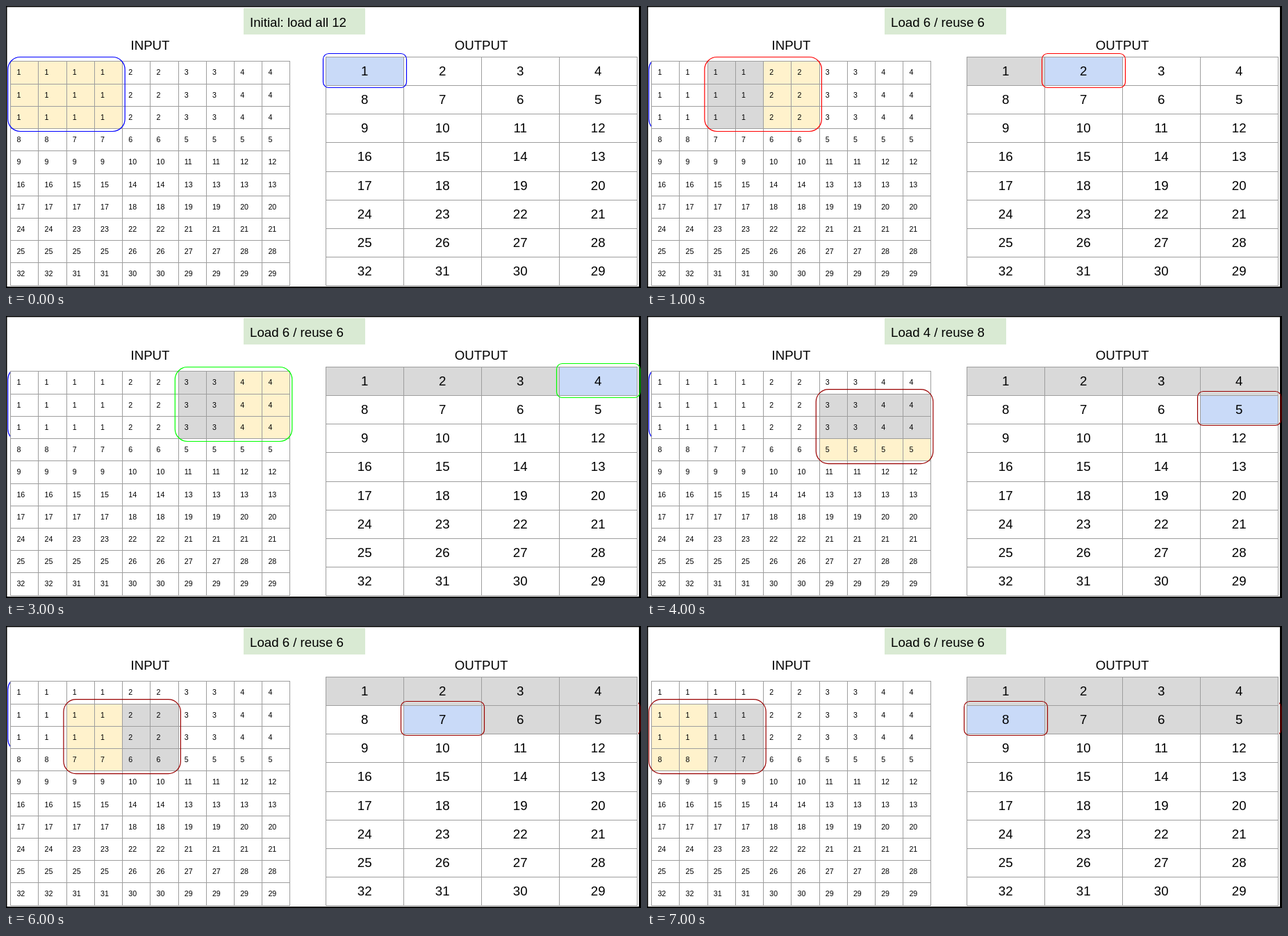
These frames come from a looping animation (914x406 px, 8000 ms). An HTML page:

```html
<!DOCTYPE html>
<html lang="en">
<head>
<meta charset="utf-8">
<title>Sliding window reuse</title>
<style>
  html, body { margin: 0; width: 100%; height: 100%; overflow: hidden; background: #fff; }
  svg { display: block; width: 914px; height: 406px; font-family: "Liberation Sans", Arial, sans-serif; }
  .fills, .lines { shape-rendering: crispEdges; }
  .lines { fill: #9e9e9e; }
  .big { font-size: 18.67px; }
  .small { font-size: 10.67px; }
  .mid { text-anchor: middle; }
  .outline { fill: none; stroke-width: 1.2; }
</style>
</head>
<body>
<svg viewBox="0 0 914 406">
  <defs>
    <clipPath id="leftEdge"><rect x="0" y="79" width="6" height="97"/></clipPath>
    <clipPath id="rightEdge"><rect x="910" y="100" width="4" height="65"/></clipPath>
  </defs>
  <path d="M0 0H914V406H0ZM1.5 1.5V404H911V1.5Z" fill-rule="evenodd"/>
  <rect x="342" y="3" width="175" height="38" fill="#d9ead3"/>
  <text id="title" class="big" x="351" y="29.5"></text>
  <text class="big mid" x="207.5" y="63">INPUT</text>
  <text class="big mid" x="684" y="63">OUTPUT</text>
  <g id="fills" class="fills"></g>
  <g id="lines" class="lines"></g>
  <g id="numbers"></g>
  <g id="outlines"></g>
</svg>
<script>
const STEP_MS = 1000, STEPS = 8;
const LOADED = '#fff2cc', REUSED = '#d9d9d9', CURRENT = '#c9daf8';
const STROKES = ['#0000ff', '#ff0000', '#9900ff', '#00ff00', '#990000'];
const input = { x: 6.2, y: 79.4, w: 40.22, h: 32.23, cols: 10, rows: 10 };
const output = { x: 460, y: 73, w: 112, h: 41.15, cols: 4, rows: 8 };
const byId = id => document.getElementById(id);

const rect = (x, y, w, h, attrs = '') =>
  `<rect x="${x}" y="${y}" width="${w}" height="${h}" ${attrs}/>`;
const colX = (grid, c) => Math.round(grid.x + c * grid.w);
const rowY = (grid, r) => Math.round(grid.y + r * grid.h);
const fillCell = (grid, c, r, color) => {
  const x = colX(grid, c), y = rowY(grid, r);
  return rect(x, y, colX(grid, c + 1) - x, rowY(grid, r + 1) - y, `fill="${color}"`);
};

// The output is visited in a snake: even rows left to right, odd rows back.
const outputValue = (c, r) => r * 4 + (r % 2 ? 4 - c : c + 1);
const inputValue = (c, r) => {
  const row = Math.max(0, r - 2), pair = Math.floor(c / 2);
  return outputValue(row % 2 ? Math.min(3, pair) : Math.max(0, pair - 1), row);
};
const position = step => {
  const row = Math.floor(step / 4);
  return { row, col: row % 2 ? 7 - step : step };
};
const inWindow = (step, c, r) => {
  if (step < 0) return false;
  const { col, row } = position(step);
  return c >= col * 2 && c < col * 2 + 4 && r >= row && r < row + 3;
};

function gridLines(grid) {
  const x = colX(grid, 0), y = rowY(grid, 0);
  const width = colX(grid, grid.cols) - x + 1, height = rowY(grid, grid.rows) - y + 1;
  let out = '';
  for (let c = 0; c <= grid.cols; c++) out += rect(colX(grid, c), y, 1, height);
  for (let r = 0; r <= grid.rows; r++) out += rect(x, rowY(grid, r), width, 1);
  return out;
}

function gridNumbers(grid, value, cls, dx, dy) {
  let out = '';
  for (let r = 0; r < grid.rows; r++)
    for (let c = 0; c < grid.cols; c++)
      out += `<text class="${cls}" x="${grid.x + c * grid.w + dx}" y="${grid.y + r * grid.h + dy}">${value(c, r)}</text>`;
  return out;
}

const outlineAttrs = (step, radius, clip) =>
  `class="outline" rx="${radius}" stroke="${STROKES[Math.min(step, 4)]}"` + (clip ? ` clip-path="url(#${clip})"` : '');

function inputOutline(step, clip) {
  const { col, row } = position(step);
  return rect(2.7 + col * 80.2, 73.5 + row * 32.1, 168.5, 107, outlineAttrs(step, 17.8, clip));
}

function outputOutline(step, clip) {
  const { col, row } = position(step);
  return rect(456.5 + col * 112, 68.5 + row * 40, 120, 49, outlineAttrs(step, 8, clip));
}

function draw(step) {
  let fills = '', reused = 0;
  for (let r = 0; r < input.rows; r++)
    for (let c = 0; c < input.cols; c++) {
      if (!inWindow(step, c, r)) continue;
      const kept = inWindow(step - 1, c, r);
      reused += kept;
      fills += fillCell(input, c, r, kept ? REUSED : LOADED);
    }
  for (let k = 0; k <= step; k++) {
    const { col, row } = position(k);
    fills += fillCell(output, col, row, k === step ? CURRENT : REUSED);
  }
  let outlines = inputOutline(step) + outputOutline(step);
  // Slivers of earlier outlines linger beyond the table edges.
  if (step > 0 && step < 7) outlines += inputOutline(0, 'leftEdge');
  if (step > 4) outlines += outputOutline(4, 'rightEdge');

  byId('fills').innerHTML = fills;
  byId('outlines').innerHTML = outlines;
  byId('title').textContent = step ? `Load ${12 - reused} / reuse ${reused}` : 'Initial: load all 12';
}

byId('lines').innerHTML = gridLines(input) + gridLines(output);
byId('numbers').innerHTML =
  gridNumbers(input, inputValue, 'small', 9.2, 20) +
  gridNumbers(output, outputValue, 'big mid', 56.2, 27);

let shown = 0;
draw(shown);
const start = performance.now();
function tick(now) {
  const step = Math.floor(Math.max(0, now - start) / STEP_MS) % STEPS;
  if (step !== shown) draw(shown = step);
  requestAnimationFrame(tick);
}
requestAnimationFrame(tick);
</script>
</body>
</html>
```
